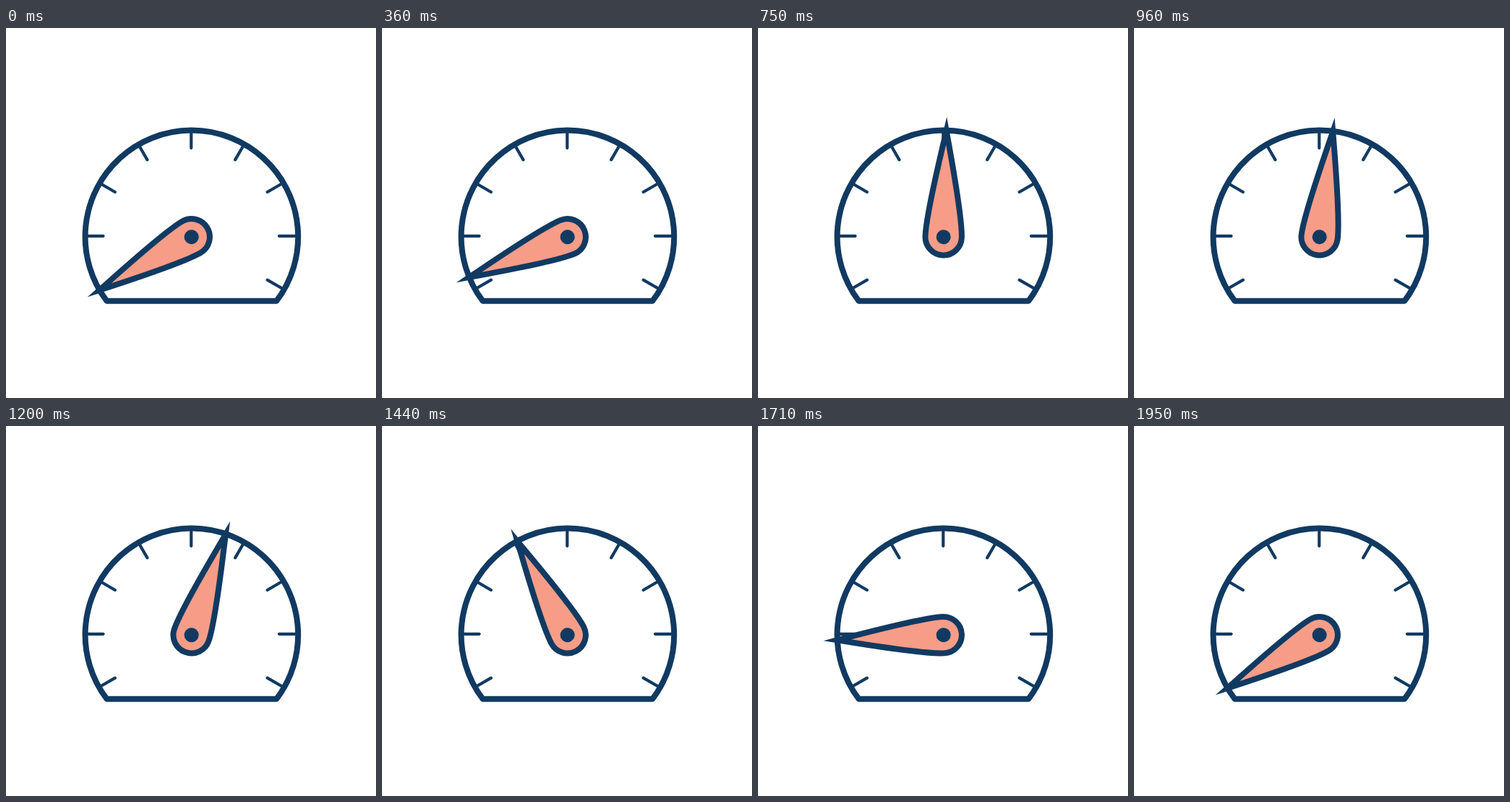
These frames come from a looping animation (512x512 px, 2.7 s). An HTML page:

```html
<!DOCTYPE html>
<html lang="en">
<head>
<meta charset="utf-8">
<title>Gauge</title>
<style>
  html, body { margin: 0; width: 100%; height: 100%; overflow: hidden; background: #fff; }
  svg { display: block; width: 100%; height: 100%; }
  .line { stroke: #113a62; stroke-width: 8; fill: none; }
  #ticks { stroke-width: 4.2; stroke-linecap: round; }
  #dial { stroke-linejoin: round; }
  #needle path { fill: #f79d87; stroke-miterlimit: 12; }
  #needle circle { fill: #113a62; }
</style>
</head>
<body>
<svg viewBox="0 0 512 512">
  <path id="ticks" class="line" transform="translate(256.3 287.8)"/>
  <path id="dial" class="line" transform="translate(256.7 288)" d="M-117.3 89.7A147.3 147.3 0 1 1 117.7 89.7Z"/>
  <g id="needle">
    <path class="line" d="M0 -147Q25.2 -28 25.2 0A25.2 25.2 0 0 1 -25.2 0Q-25.2 -28 0 -147Z"/>
    <circle r="10"/>
  </g>
</svg>
<script>
  const LOOP = 2700, STEP = 30;

  // [time in ms, needle angle in degrees clockwise from upright]
  const KEYS = [[320, -120], [602, 21.5], [850, -9.5], [1080, 26.3], [1950, -120]];

  const needle = document.getElementById('needle');
  const ease = u => u * u * (3 - 2 * u);

  function angleAt(t) {
    if (t <= KEYS[0][0]) return KEYS[0][1];
    for (let i = 1; i < KEYS.length; i++) {
      const [t0, a0] = KEYS[i - 1], [t1, a1] = KEYS[i];
      if (t < t1) return a0 + (a1 - a0) * ease((t - t0) / (t1 - t0));
    }
    return KEYS[KEYS.length - 1][1];
  }

  function polar(r, deg) {
    const a = deg * Math.PI / 180;
    return (r * Math.sin(a)).toFixed(2) + ' ' + (-r * Math.cos(a)).toFixed(2);
  }

  let ticks = '';
  for (let a = -120; a <= 120; a += 30) ticks += `M${polar(147, a)}L${polar(121.7, a)}`;
  document.getElementById('ticks').setAttribute('d', ticks);

  function draw(ms) {
    const t = Math.floor((ms % LOOP) / STEP) * STEP;
    needle.setAttribute('transform', `translate(256.7 289.2) rotate(${angleAt(t).toFixed(2)})`);
  }

  const start = performance.now();
  function tick() {
    draw(performance.now() - start);
    requestAnimationFrame(tick);
  }
  draw(0);
  requestAnimationFrame(tick);
</script>
</body>
</html>
```
